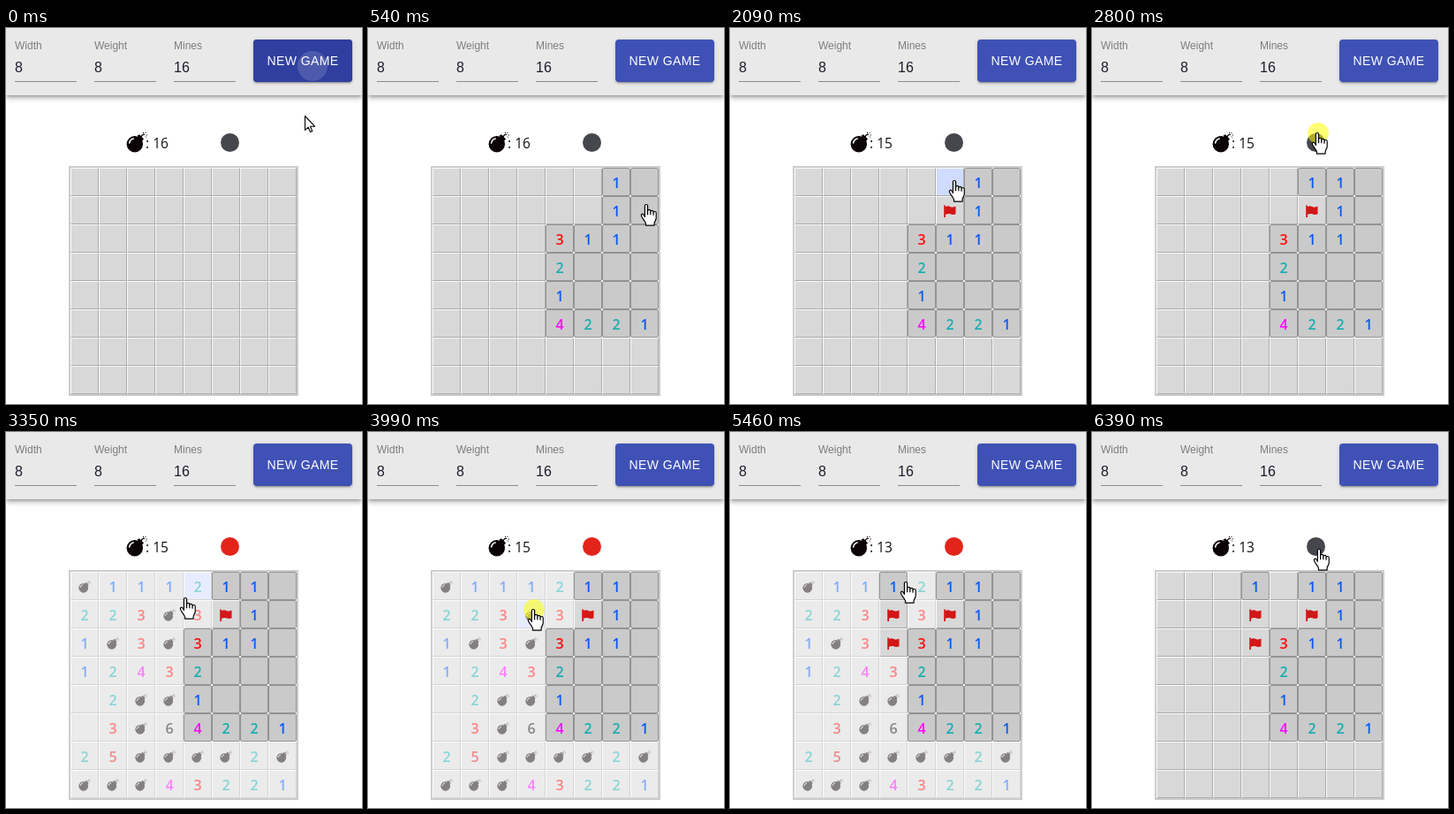
Write an HTML page that moves like this. It is 403x425 px and loops after 6470 ms.

```html
<!DOCTYPE html>
<html lang="en">
<head>
<meta charset="utf-8">
<title>Minesweeper</title>
<style>
  html, body { margin: 0; width: 100%; height: 100%; overflow: hidden; background: #fff; }
  body { position: relative; font-family: "Liberation Sans", Arial, sans-serif; }
  body > *, header > * { position: absolute; }
  header {
    left: 0; top: 0; width: 403px; height: 76px; background: #e9e9e9;
    box-shadow: 0 2px 4px -1px rgba(0,0,0,.3), 0 4px 5px rgba(0,0,0,.14), 0 1px 10px rgba(0,0,0,.12);
  }
  .field { top: 12px; width: 70px; height: 48px; border-bottom: 1px solid #8c8c8c; }
  .field span { display: block; font-size: 12px; line-height: 16px; color: #7d7d7d; }
  .field b { display: block; margin-top: 6px; font-weight: 400; font-size: 16px; line-height: 21px; color: #1c1c2c; }
  #button {
    left: 280px; top: 13px; width: 112px; height: 48px; border-radius: 4px;
    background: #3f51b5; color: #fff; font-size: 14px; line-height: 48px; letter-spacing: .4px; text-align: center;
    box-shadow: 0 3px 1px -2px rgba(0,0,0,.2), 0 2px 2px rgba(0,0,0,.14), 0 1px 5px rgba(0,0,0,.12);
  }
  #pressed { position: absolute; inset: 0; border-radius: 4px; background: #303f9f; }
  #pressed::after {
    content: ""; position: absolute; left: 50px; top: 13px; width: 34px; height: 34px;
    border-radius: 50%; background: rgba(255,255,255,.15);
  }
  #button span { position: relative; }
  #counter-icon { left: 136px; top: 117px; width: 24px; height: 24px; }
  #counter { left: 158px; top: 119px; font: 15.5px/22px "Open Sans", sans-serif; color: #111; white-space: pre; }
  #badge { left: 243px; top: 119px; width: 21px; height: 21px; border-radius: 50%; background: #46474d; }
  #badge.on { background: #e3241b; }
  #board {
    left: 71px; top: 156px; border: 2px solid #cdcdcd;
    display: grid; grid-template: repeat(8, 32px) / repeat(8, 32px);
  }
  .cell {
    position: relative; box-sizing: border-box; background: #d8d8d8;
    border: 1px solid; border-color: #fafafa #ababab #ababab #fafafa;
    font: 600 16px/32px "Open Sans", sans-serif; text-align: center;
  }
  .cell > * { display: none; }
  .cell svg { position: absolute; left: 8px; top: 9px; width: 14px; height: 14px; }
  .cell.hover { background: #d0dcff; }
  .cell.hint { opacity: .5; }
  .cell.open { background: #cacaca; border-color: #939393; border-radius: 2px; }
  .hint .content, .open .content, .flagged .flag { display: block; }
  #halo { left: -12px; top: -12px; width: 24px; height: 24px; border-radius: 50%; background: rgba(255,255,0,.55); }
  #cursor {
    left: 0; top: 0; width: 1px; height: 1px; overflow: visible;
    fill: #fff; stroke: #000; stroke-width: 1.1; stroke-linejoin: round;
  }
</style>
</head>
<body>
<svg width="0" height="0">
  <symbol id="bomb" viewBox="0 0 24 24">
    <circle cx="9.8" cy="14.2" r="9.2" fill="#0b0406"/>
    <path d="M12.5 4.8 15 3.2l5 5.4-2.4 2.6z" fill="#0b0406"/>
    <path d="M17 6q1-3 4-2.6" fill="none" stroke="#0b0406" stroke-width="1.3"/>
    <path d="M19.5 2.2V.8M21.6 1.9l.9-1M22.6 4h1.2M21.9 5.6l1 1" stroke="#0b0406"/>
    <path d="M3.6 13q.8-4 4.6-5" fill="none" stroke="#fff" stroke-width="1.5" stroke-linecap="round"/>
  </symbol>
  <symbol id="flag" viewBox="0 0 14 14">
    <path d="M.2.6H2V14H.2zM2 2C4 .8 6 1.2 7.5 2S11 2.8 13.5 1.5V10.3C11 11.4 9 11 7.5 10.3S4 9.8 2 10.8Z" fill="#d31616"/>
  </symbol>
</svg>

<header>
  <div class="field" style="left:10px"><span>Width</span><b>8</b></div>
  <div class="field" style="left:100px"><span>Weight</span><b>8</b></div>
  <div class="field" style="left:190px"><span>Mines</span><b>16</b></div>
  <div id="button"><div id="pressed"></div><span>NEW GAME</span></div>
</header>
<svg id="counter-icon"><use href="#bomb"/></svg>
<div id="counter"></div>
<div id="badge"></div>
<div id="board"></div>
<div id="halo"></div>
<svg id="cursor">
  <path id="arrow" d="M.5.5V16.5L4.1 13.2 6.6 18.6 8.8 17.6 6.4 12.2H11.5Z"/>
  <g id="hand" transform="translate(-1 -.5) scale(1.07)">
    <path d="M-1.5 13V1.5a1.5 1.5 0 0 1 3 0V7c0-2 3-2 3 0V8c0-2 3-2 3 0V9c0-2 3-2 3 0V14c0 3-2 4-2 6V22H-.5V20C-1 18-4 15-5 12.5-6 10.5-4 9-2.8 10.8Z"/>
    <path d="M1.5 7V11M4.5 8V11M7.5 9V11.5" fill="none"/>
  </g>
</svg>

<script>
const LOOP = 6470;
const TICK = 80;
const SIZE = 8;
const CELL = 32;
const ORIGIN = { x: 73, y: 158 };
const FIELD = ['*.......', '...*.*..', '.*.*....', '........', '..**....', '..*.....', '..****.*', '***.....'];
const COLORS = ['', '#0a5af0', '#18adb0', '#ff0a0a', '#ff00ff', '#e01c1c', '#111'];
const HOLD = { open: 80, hint: 80, flag: 150 };

// Pointer moves during [go, arrive] to (x, y); a click there takes effect at `release`.
const START = { x: 338, y: 99 };
const STOPS = [
  { go: 0, arrive: 390, x: 316, y: 200, release: 540, act: 'open' },
  { go: 630, arrive: 1080, x: 257, y: 198, release: 1480, act: 'flag' },
  { go: 1550, arrive: 2100, x: 255, y: 169, release: 2260, act: 'open' },
  { go: 2260, arrive: 2570, x: 256, y: 119, release: 2880, act: 'hint' },
  { go: 2880, arrive: 3350, x: 204, y: 188 },
  { go: 3510, arrive: 3910, x: 188, y: 201, release: 4140, act: 'flag' },
  { go: 4140, arrive: 4370, x: 190, y: 227, release: 4600, act: 'flag' },
  { go: 4600, arrive: 4920, x: 190, y: 177, release: 5380, act: 'open' },
  { go: 5380, arrive: 5850, x: 252, y: 132, release: 6010, act: 'hint' },
  { go: 6230, arrive: 6390, x: 258, y: 133 }
];

const $ = id => document.getElementById(id);
const clamp01 = v => Math.min(1, Math.max(0, v));

const cells = Array.from({ length: SIZE * SIZE }, (_, i) => {
  const row = Math.floor(i / SIZE), col = i % SIZE;
  return { row, col, mine: FIELD[row][col] === '*', openAt: Infinity, flagAt: Infinity };
});
const neighbours = cell =>
  cells.filter(c => c !== cell && Math.abs(c.row - cell.row) < 2 && Math.abs(c.col - cell.col) < 2);
const mineCount = cells.filter(c => c.mine).length;

function cellAt({ x, y }) {
  const col = Math.floor((x - ORIGIN.x) / CELL), row = Math.floor((y - ORIGIN.y) / CELL);
  return cells.find(c => c.row === row && c.col === col);
}

function reveal(cell, time) {
  if (cell.openAt < Infinity) return;
  cell.openAt = time;
  if (cell.count === 0) neighbours(cell).forEach(c => reveal(c, time));
}

function buildBoard() {
  for (const cell of cells) {
    cell.count = neighbours(cell).filter(c => c.mine).length;
    cell.el = document.createElement('div');
    const content = cell.mine
      ? '<svg class="content"><use href="#bomb"/></svg>'
      : `<span class="content" style="color:${COLORS[cell.count]}">${cell.count || ''}</span>`;
    cell.el.innerHTML = content + '<svg class="flag"><use href="#flag"/></svg>';
    $('board').append(cell.el);
  }
  for (const stop of STOPS) {
    if (stop.act === 'open') reveal(cellAt(stop), stop.release);
    if (stop.act === 'flag') cellAt(stop).flagAt = stop.release;
  }
}

function pointerAt(t) {
  let { x, y } = START;
  for (const stop of STOPS) {
    if (t < stop.go) break;
    const span = stop.arrive - stop.go;
    const steps = Math.round(span / TICK);
    const p = Math.floor(clamp01((t - stop.go) / span) * steps) / steps;
    x += (stop.x - x) * p;
    y += (stop.y - y) * p;
  }
  return { x: Math.round(x), y: Math.round(y) };
}

function render(t) {
  const { x, y } = pointerAt(t);
  const hovered = cellAt(pointerAt(t - TICK)); // hover trails the pointer
  const hint = STOPS.filter(s => s.act === 'hint' && t >= s.release).length % 2 === 1;
  const pressing = STOPS.some(s => s.act && t >= s.release - HOLD[s.act] && t < s.release);

  for (const cell of cells) {
    const open = t >= cell.openAt, flagged = t >= cell.flagAt;
    const state = { open, flagged, hint: hint && !open && !flagged, hover: !open && cell === hovered };
    cell.el.className = ['cell', ...Object.keys(state).filter(key => state[key])].join(' ');
  }

  $('counter').textContent = ': ' + (mineCount - cells.filter(c => t >= c.flagAt).length);
  $('badge').classList.toggle('on', hint);
  $('pressed').style.opacity = clamp01(1 - t / 310);

  const hand = y >= ORIGIN.y || Math.hypot(x - 253, y - 129) < 14;
  $('hand').style.display = hand ? '' : 'none';
  $('arrow').style.display = hand ? 'none' : '';
  $('halo').style.display = pressing ? '' : 'none';
  $('cursor').style.transform = $('halo').style.transform = `translate(${x}px, ${y}px)`;
}

buildBoard();
const start = performance.now();
function tick() {
  render((performance.now() - start) % LOOP);
  requestAnimationFrame(tick);
}
tick();
</script>
</body>
</html>
```
